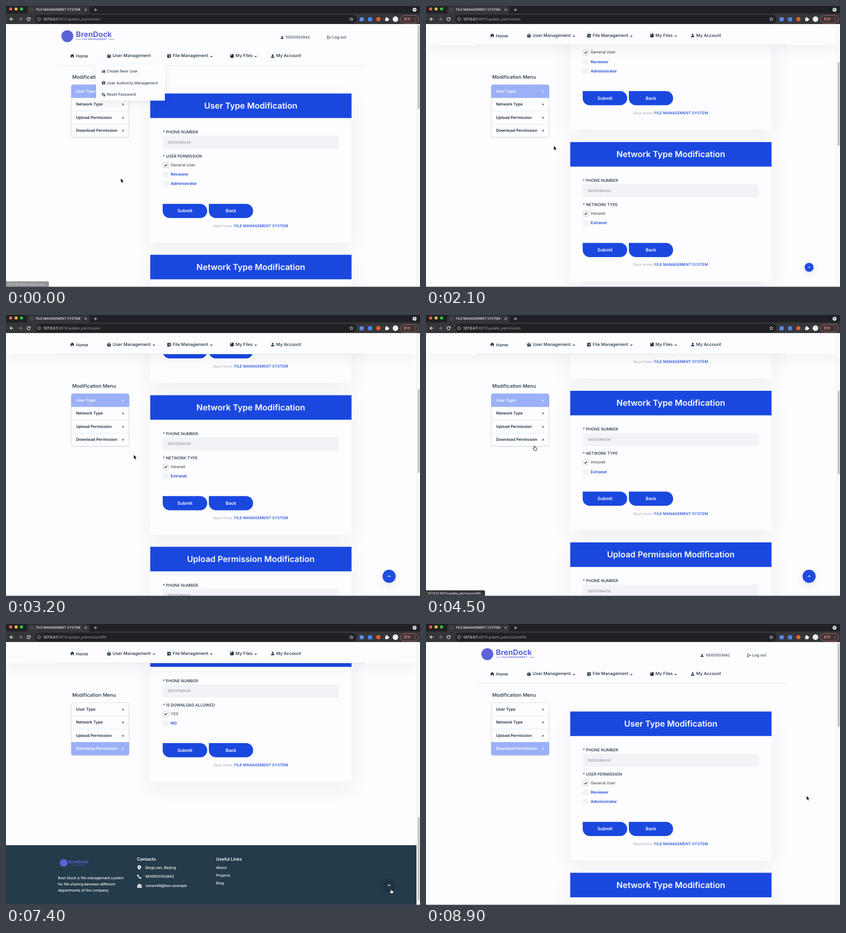
These frames come from a looping animation (800 by 545 pixels, 9000 ms). An HTML page with a canvas:

```html
<!DOCTYPE html>
<html lang="en">
<head>
<meta charset="utf-8">
<title>File Management System</title>
<style>
html, body { margin: 0; width: 100%; height: 100%; overflow: hidden; background: #fdfdff; }
canvas { display: block; width: 800px; height: 545px; }
</style>
</head>
<body>
<canvas id="stage"></canvas>
<script>
const W = 800, H = 545, LOOP = 9000;
const BLUE = '#1a48df', INK = '#1d3040', PAGE = '#fdfdff', FOOT = '#233b4a', MARK = '#5b62d9';
const BRAND = 'BrenDock', PHONE = '10055503842', FIELD = '10055596438';
const HOST = '127.0.0.1', PATH = ':8011/update_permission';
const JUMP = 5200, TOP_CLICK = 7400, TOP_TIME = 524, BOTTOM = 1035;

const cv = document.getElementById('stage');
const g = cv.getContext('2d');
const dpr = Math.max(1, window.devicePixelRatio || 1);
cv.width = W * dpr;
cv.height = H * dpr;

// ---------- timing ----------
const clamp = x => Math.min(1, Math.max(0, x));
const part = (t, a, b) => clamp((t - a) / (b - a));
const smooth = x => x * x * (3 - 2 * x);

// keys: [time, ...values]
function track(keys, t, ease) {
  if (t <= keys[0][0]) return keys[0].slice(1);
  for (let i = 1; i < keys.length; i++) {
    const a = keys[i - 1], b = keys[i];
    if (t < b[0]) {
      const p = ease(part(t, a[0], b[0]));
      return a.slice(1).map((v, k) => v + (b[k + 1] - v) * p);
    }
  }
  return keys[keys.length - 1].slice(1);
}

const WHEEL = [[1300, 0], [2100, 218.5], [2600, 275], [3300, 335.5]];
const POINTER = [
  [200, 222, 334.5], [1200, 247, 271.5], [3500, 247, 271.5], [4350, 209.5, 253.5],
  [5500, 209.5, 253.5], [6900, 744, 513.5], [8150, 744, 513.5], [8750, 735.5, 333.5]
];

function scrollAt(t) {
  if (t < JUMP) return track(WHEEL, t, x => x)[0];
  return BOTTOM * (1 + Math.cos(Math.PI * part(t, TOP_CLICK, TOP_CLICK + TOP_TIME))) / 2;
}

// ---------- drawing helpers ----------
function text(s, x, y, size, color = INK, weight = 400, align = 'left') {
  g.font = `${weight} ${size}px Inter, "Noto Sans CJK SC", "Noto Sans CJK", sans-serif`;
  g.fillStyle = color;
  g.textAlign = align;
  g.textBaseline = 'middle';
  g.fillText(s, x, y);
  return g.measureText(s).width;
}
function rect(x, y, w, h, color) {
  g.fillStyle = color;
  g.fillRect(x, y, w, h);
}
function round(x, y, w, h, r, fill, stroke, lw = 1) {
  g.beginPath();
  g.roundRect(x, y, w, h, r);
  if (fill) { g.fillStyle = fill; g.fill(); }
  if (stroke) { g.strokeStyle = stroke; g.lineWidth = lw; g.stroke(); }
}
function disc(x, y, r, color) {
  g.beginPath();
  g.arc(x, y, r, 0, 7);
  g.fillStyle = color;
  g.fill();
}
function ring(x, y, r, color, lw = 1, a = 0, b = Math.PI * 2) {
  g.beginPath();
  g.arc(x, y, r, a, b);
  g.strokeStyle = color;
  g.lineWidth = lw;
  g.stroke();
}
function line(pts, color, lw = 1) {
  g.beginPath();
  pts.forEach(p => g.lineTo(...p));
  g.strokeStyle = color;
  g.lineWidth = lw;
  g.stroke();
}
function poly(pts, color) {
  g.beginPath();
  pts.forEach(p => g.lineTo(...p));
  g.closePath();
  g.fillStyle = color;
  g.fill();
}
function shadow(color, blur, dy) {
  g.shadowColor = color;
  g.shadowBlur = blur * dpr;
  g.shadowOffsetY = dy * dpr;
}
const noShadow = () => shadow('transparent', 0, 0);
const chevron = (x, y, w, color, lw, dir = 1) =>
  line([[x - w, y - w * dir / 2], [x, y + w * dir / 2], [x + w, y - w * dir / 2]], color, lw);

// ---------- icons, centred on x, y ----------
const icon = {
  home(x, y) {
    poly([[x - 4, y], [x, y - 3.8], [x + 4, y], [x + 3, y], [x + 3, y + 3.3], [x + 1, y + 3.3],
      [x + 1, y + 1], [x - 1, y + 1], [x - 1, y + 3.3], [x - 3, y + 3.3], [x - 3, y]], INK);
  },
  basket(x, y) {
    line([[x - 2.2, y - 0.5], [x - 1.8, y - 3], [x + 1.8, y - 3], [x + 2.2, y - 0.5]], INK, 1);
    round(x - 4, y - 1, 8, 2, 0.6, INK);
    round(x - 3.3, y + 1.5, 6.6, 2, 0.6, INK);
  },
  file(x, y) {
    round(x - 3.5, y - 3.3, 7, 6.8, 1, INK);
    rect(x - 2.3, y - 1.3, 4.6, 0.9, PAGE);
    rect(x, y + 0.8, 2, 1.4, PAGE);
  },
  book(x, y) {
    round(x - 3.2, y - 3.6, 6.6, 7.2, 0.8, INK);
    rect(x - 1.8, y - 3.6, 1.7, 2.8, PAGE);
  },
  user(x, y, color = INK, k = 1) {
    disc(x, y - 1.6 * k, 1.7 * k, color);
    round(x - 3.2 * k, y + 0.7 * k, 6.4 * k, 2.5 * k, [1.6 * k, 1.6 * k, 0, 0], color);
  },
  group(x, y) {
    icon.user(x + 1, y, INK, 0.8);
    disc(x - 2.5, y - 0.6, 0.8, INK);
    rect(x - 3.8, y + 1, 2, 1.4, INK);
  },
  badge(x, y) {
    round(x - 3, y - 3, 6, 6, 0.8, INK);
    icon.user(x, y, PAGE, 0.55);
  },
  sliders(x, y) {
    rect(x - 3.4, y - 2, 6.8, 1, INK);
    rect(x - 3.4, y + 1.2, 6.8, 1, INK);
    disc(x - 1.8, y - 1.5, 1.4, INK);
    disc(x + 1.8, y + 1.7, 1.4, INK);
  },
  exit(x, y) {
    line([[x, y - 2.8], [x - 2.8, y - 2.8], [x - 2.8, y + 2.8], [x, y + 2.8]], INK, 0.9);
    line([[x - 1, y], [x + 3, y]], INK, 0.9);
    line([[x + 1.4, y - 1.7], [x + 3.2, y], [x + 1.4, y + 1.7]], INK, 0.9);
  },
  pin(x, y) {
    disc(x, y - 1, 3.4, '#fff');
    poly([[x - 3.1, y + 0.4], [x + 3.1, y + 0.4], [x, y + 4.4]], '#fff');
    disc(x, y - 1, 1.2, FOOT);
  },
  phone(x, y) {
    ring(x + 3.5, y - 3.5, 6.2, '#fff', 1.6, 1.75, 2.95);
    disc(x - 2.6, y - 2.4, 1.5, '#fff');
    disc(x + 2.4, y + 2.6, 1.5, '#fff');
  },
  mail(x, y) {
    poly([[x - 4.3, y - 1.6], [x, y - 4.2], [x + 4.3, y - 1.6], [x + 4.3, y + 3.6], [x - 4.3, y + 3.6]], '#fff');
    line([[x - 3.6, y - 1], [x, y + 1], [x + 3.6, y - 1]], FOOT, 0.9);
  }
};

// ---------- page ----------
const CARDS = [
  ['User Type', 'USER PERMISSION', ['General User', 'Reviewer', 'Administrator'], 169.7],
  ['Network Type', 'NETWORK TYPE', ['Intranet', 'Extranet'], 482.5],
  ['Upload Permission', 'IS UPLOAD ALLOWED', ['YES', 'NO'], 776.5],
  ['Download Permission', 'IS DOWNLOAD ALLOWED', ['YES', 'NO'], 1070.5]
];

function button(label, x, y, w) {
  round(x, y, w, 27.5, [0, 13.7, 13.7, 13.7], BLUE);
  text(label, x + w / 2, y + 13.9, 8.5, '#fff', 600, 'center');
}

function card([title, label, options, top], scroll) {
  const y = top - scroll, low = y + 177 + (options.length - 2) * 18.4;
  if (y > H + 60 || low < -100) return;
  shadow('rgba(30,45,80,.065)', 36, 12);
  rect(278.7, y, 389, low + 93.5 - y, PAGE);
  noShadow();
  rect(278.7, y, 389, 47.6, BLUE);
  text(title + ' Modification', 473, y + 24.4, 16, '#fff', 600, 'center');
  text('* PHONE NUMBER', 303, y + 74.7, 7.7, INK, 550);
  round(302.8, y + 81.7, 340.5, 25.5, 3.5, '#f1f3f7');
  text(FIELD, 312, y + 94.8, 6.85, '#868d94');
  text('* ' + label, 303, y + 122, 7.7, INK, 550);
  options.forEach((name, i) => {
    const cy = y + 138.8 + i * 18.2;
    if (i) {
      round(303, cy - 5.7, 11.5, 11.5, 2, '#f1f3f7');
    } else {
      round(303.4, cy - 5.3, 10.8, 10.8, 2, '#f4f5f7', '#cbd0d6', 0.9);
      line([[306.4, cy + 0.2], [308, cy + 1.8], [311.2, cy - 1.6]], '#222', 1.2);
    }
    text(name, 318.3, cy + 0.2, 7.7, i ? '#1f49d6' : '#4d555c', i ? 600 : 500);
  });
  button('Submit', 302.8, low + 18.6, 86);
  button('Back', 392, low + 18.6, 85.5);
  text('Back Home:', 401, low + 61.6, 6.7, '#a3a8ae');
  text('FILE MANAGEMENT SYSTEM', 441, low + 61.3, 7.42, BLUE, 450);
}

function footer(scroll) {
  const y = 1464 - scroll;
  if (y > H) return;
  rect(0, y, 793.5, H - y + 40, FOOT);
  disc(111.5, y + 34.5, 7.5, MARK);
  text(BRAND, 120.5, y + 32.8, 8.2, MARK, 700);
  text('FILE MANAGEMENT', 127, y + 39, 2.9, MARK, 500);
  const name = BRAND.replace('D', ' D');
  [name + ' is file management system', 'for file sharing between different', 'departments of the company.']
    .forEach((s, i) => text(s, 100.5, y + 64 + i * 12, 7.05, '#fff', 450));
  text('Contacts', 253, y + 27, 8.4, '#fff', 600);
  text('Useful Links', 406, y + 27, 8.4, '#fff', 600);
  icon.pin(257.5, y + 43.5);
  icon.phone(257.5, y + 61);
  icon.mail(258, y + 79);
  text('QingLuan, Beijing', 269, y + 44, 7.1, '#fff', 450);
  text('86' + PHONE, 269, y + 61.2, 7, '#fff', 450);
  text('lumen40@box.example', 270, y + 79, 7.05, '#fff', 450);
  ['About', 'Projects', 'Blog'].forEach((s, i) => text(s, 406, y + 44 + i * 15, 7.1, '#fff', 450));
}

function nav(y, open) {
  icon.home(128, y - 0.3);
  text('Home', 135.3, y + 0.7, 8.3, INK, 500);
  icon.basket(199, y);
  text('User Management', 206, y - 0.2, 8.4, INK, 500);
  if (!open) chevron(285.8, y + 0.8, 1.8, INK, 1.2);
  icon.file(315, y);
  text('File Management', 322, y - 0.2, 8.4, INK, 500);
  chevron(396.8, y + 0.8, 1.8, INK, 1.2);
  icon.book(436.5, y - 0.2);
  text('My Files', 443.5, y - 0.2, 8.4, INK, 500);
  chevron(482.5, y + 0.8, 1.8, INK, 1.2);
  icon.user(515.3, y);
  text('My Account', 522, y - 0.2, 8.4, INK, 500);
  rect(99, y + 17.6, 596, 0.9, '#dfe2e6');
}

function header(scroll, open) {
  if (scroll > 100) {
    shadow('rgba(30,45,80,.06)', 24, 8);
    rect(0, 35, 793.5, 41, PAGE);
    noShadow();
    nav(57.4, false);
    return;
  }
  const y = -scroll;
  disc(118.5, y + 58.5, 11.5, MARK);
  text(BRAND, 135, y + 56, 14.6, MARK, 700);
  text('FILE MANAGEMENT', 147, y + 64.8, 5.1, MARK, 450);
  rect(135, y + 64.4, 10, 0.7, MARK);
  rect(199, y + 64.4, 10.5, 0.7, MARK);
  icon.user(533.5, y + 61, INK, 0.85);
  text(PHONE, 540, y + 61.2, 7.2);
  icon.exit(624, y + 61);
  text('Log out', 630.5, y + 61.2, 7.55);
  nav(y + 97, open);
}

function sidebar(active) {
  text('Modification Menu', 128, 138, 9.45, INK, 500);
  shadow('rgba(30,50,70,.2)', 2, 0.8);
  round(126.2, 152.7, 111.6, 101.8, 4, PAGE);
  noShadow();
  CARDS.forEach(([name], i) => {
    const y = 152.5 + i * 25.5, on = i === active, color = on ? '#fff' : INK;
    if (on) round(126, y, 112, 25.5, i ? [0, 0, 4, 4] : [4, 4, 0, 0], '#9bb0f8');
    else if (i) rect(126.5, y, 111, 0.7, '#d9dfe6');
    text(name, 135.5, y + 13.2, 7.6, color, 600);
    text('>', 223.6, y + 13.2, 7.6, color, 600);
  });
  round(126.3, 152.8, 111.4, 101.6, 4, null, 'rgba(150,168,190,.4)', 0.7);
}

function dropdown(alpha) {
  if (alpha <= 0) return;
  g.globalAlpha = alpha;
  shadow('rgba(30,45,80,.09)', 14, 4);
  rect(174, 113.5, 133, 70, PAGE);
  noShadow();
  [['group', 'Create New User'], ['badge', 'User Authority Management'], ['sliders', 'Reset Password']]
    .forEach(([pic, name], i) => {
      icon[pic](188.5, 126.5 + i * 22.8);
      text(name, 194.7, 126.5 + i * 22.8, 7.45);
    });
  g.globalAlpha = 1;
}

function topButton(size, hover, alpha) {
  if (size <= 0) return;
  g.globalAlpha = alpha;
  shadow('rgba(30,45,80,.1)', 14, 5);
  disc(740.3, 506.8, 12.7 * size, hover ? '#1e3441' : '#1f4ce0');
  noShadow();
  chevron(740.3, 506.8, 2.5 * size, '#fff', 1.1, -1);
  g.globalAlpha = 1;
}

// ---------- browser frame ----------
function browser(hash) {
  rect(0, 0, W, 35, '#35363a');
  rect(0, 0, W, 14.5, '#202124');
  round(41, 0.8, 120, 15, [4, 4, 0, 0], '#35363a');
  ['#ff5f57', '#febc2e', '#28c840'].forEach((c, i) => disc(9 + i * 10.5, 5.8, 3, c));
  ring(49.5, 7.3, 3, '#5d5f64', 1);
  line([[47.6, 5.2], [51.4, 9.4]], '#5d5f64', 0.8);
  text('FILE MANAGEMENT SYSTEM', 58, 7.5, 6.1, '#f1f3f4', 450);
  line([[152, 5.4], [155.8, 9.2]], '#e8eaed', 0.9);
  line([[155.8, 5.4], [152, 9.2]], '#e8eaed', 0.9);
  line([[170, 7.4], [176, 7.4]], '#e8eaed', 0.9);
  line([[173, 4.4], [173, 10.4]], '#e8eaed', 0.9);
  disc(789.5, 7.3, 3.8, '#e8eaed');
  poly([[787.6, 6.3], [791.4, 6.3], [789.5, 8.8]], '#202124');

  [[11, -1, '#f1f3f4'], [27.5, 1, '#85878b']].forEach(([x, d, c]) => {
    line([[x - 3.3, 25.5], [x + 3.3, 25.5]], c, 1.1);
    line([[x, 25.5 - 3.2], [x + 3.3 * d, 25.5], [x, 25.5 + 3.2]], c, 1.1);
  });
  ring(43.7, 25.5, 3, '#f1f3f4', 1.1, 0.3, 5.5);
  poly([[47.4, 22], [47.4, 25.2], [44.2, 25.2]], '#f1f3f4');

  round(56.5, 17.3, 621, 16.4, 8.2, '#202124');
  ring(63.8, 25.5, 3.2, '#c4c7cb', 0.8);
  rect(63.4, 25, 0.8, 2.2, '#c4c7cb');
  rect(63.4, 23.5, 0.8, 0.8, '#c4c7cb');
  const w = text(HOST, 72, 25.7, 7.1, '#f1f3f4', 450);
  text(PATH + hash, 72 + w, 25.7, 7.1, '#9aa0a6');

  const star = [];
  for (let i = 0; i < 11; i++) {
    const a = -Math.PI / 2 + i * Math.PI / 5, r = i % 2 ? 1.6 : 3.6;
    star.push([667.3 + r * Math.cos(a), 25.7 + r * Math.sin(a)]);
  }
  line(star, '#e8eaed', 0.8);
  rect(683.5, 22, 7.5, 7.5, '#5d8bea');
  rect(699.7, 22, 7.6, 7.6, '#4a86f2');
  disc(719.6, 25.6, 4, '#e2602c');
  round(732.8, 23.3, 6, 6, 0.8, '#f1f3f4');
  disc(735.6, 23, 1.4, '#f1f3f4');
  disc(739, 26.2, 1.4, '#f1f3f4');
  disc(752.6, 25.5, 5.4, '#eeeeee');
  round(762.2, 18.4, 35, 14.6, 7.3, '#3a3335', '#c9786f', 0.8);
  text('更新', 768, 25.8, 7, '#f28b82');
  [-2.8, 0, 2.8].forEach(d => disc(790, 25.7 + d, 0.75, '#f28b82'));
}

function scrollbar(scroll) {
  rect(793.5, 35, 6.5, H, '#fafafa');
  rect(793.5, 35, 0.6, H, '#e6e6e6');
  round(795.5, 37 + scroll * 0.3255, 3.8, 163, 1.9, '#c1c1c1');
}

function status(s, width, alpha) {
  if (alpha <= 0) return;
  g.globalAlpha = alpha;
  round(0, 534, width, 12, [0, 3, 0, 0], '#35363a');
  text(s, 2.5, 539.8, 6.05, '#fff');
  g.globalAlpha = 1;
}

function pointer(x, y, hand) {
  g.save();
  g.translate(x, y);
  g.lineJoin = 'round';
  if (hand) {
    g.beginPath();
    g.moveTo(-0.9, 5.5);
    g.lineTo(-0.9, 0.8);
    g.quadraticCurveTo(0, -0.5, 0.9, 0.8);
    g.lineTo(0.9, 3.4);
    g.lineTo(3.8, 4);
    g.quadraticCurveTo(5, 4.4, 4.8, 6);
    g.lineTo(3.9, 9.2);
    g.lineTo(-0.4, 9.2);
    g.lineTo(-2.8, 5.8);
    g.quadraticCurveTo(-2.6, 4.4, -0.9, 5.5);
    g.closePath();
    g.fillStyle = '#fff';
    g.strokeStyle = '#111';
    g.lineWidth = 0.9;
    g.fill();
    g.stroke();
  } else {
    const arrow = [[0, 0], [0, 7.6], [1.7, 6.1], [2.8, 8.8], [4, 8.3], [2.9, 5.7], [5.3, 5.6], [0, 0]];
    line(arrow, '#fff', 1.4);
    poly(arrow, '#111');
  }
  g.restore();
}

// ---------- frame ----------
function draw(t) {
  const scroll = scrollAt(t);
  const [px, py] = track(POINTER, t, smooth);
  const jumped = t >= JUMP;
  const menu = 1 - part(t, 200, 450);
  const size = smooth(part(t, 1900, 2220)) * (1 - smooth(part(t, 7780, 8180)));
  const onTop = size > 0 && Math.hypot(px - 740.3, py - 506.8) < 13;
  const onSide = px > 126 && px < 238 && py > 152 && py < 255;

  g.setTransform(dpr, 0, 0, dpr, 0, 0);
  g.textRendering = 'geometricPrecision';
  rect(0, 0, W, H, PAGE);
  CARDS.forEach(c => card(c, scroll));
  footer(scroll);
  sidebar(jumped ? 3 : 0);
  header(scroll, menu > 0);
  dropdown(menu);
  topButton(size, onTop, t > 7780 ? size : 1);
  scrollbar(scroll);
  browser(jumped ? '#f4' : '');
  status(HOST + ':8011/create_user', 83, 0.52 * (1 - part(t, 190, 300)));
  if (onSide) status(HOST + PATH + '#f4', 114, 1);
  rect(0, 544.4, W, 0.6, '#55585c');
  pointer(px, py, onTop || onSide);
}

const start = performance.now();
function tick() {
  draw((performance.now() - start) % LOOP);
  requestAnimationFrame(tick);
}
tick();
</script>
</body>
</html>
```
